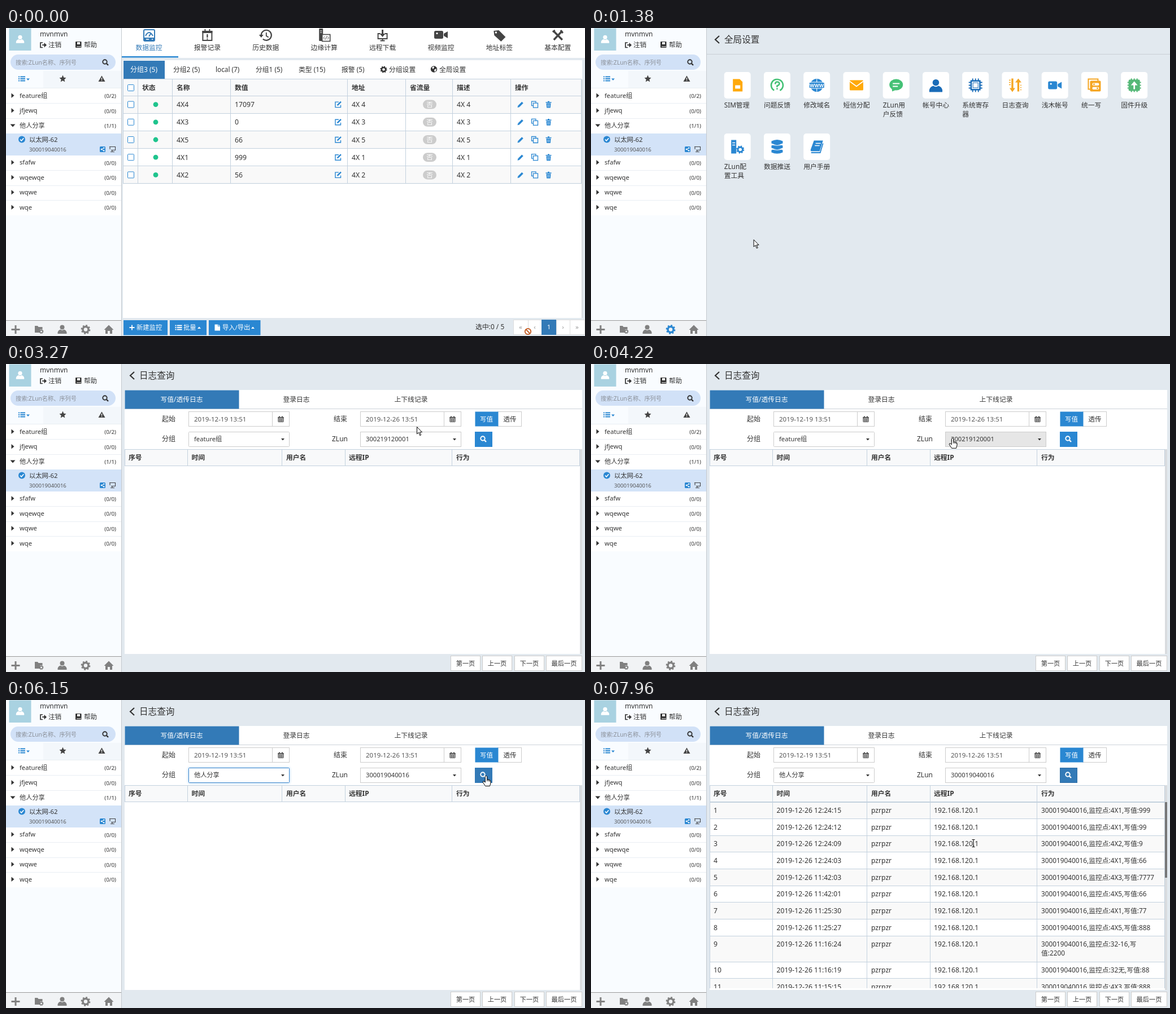
Write an HTML page that moves like this. It is 1025 px wide and 546 px high and loops after 8000 ms.

```html
<!DOCTYPE html>
<html lang="zh-CN">
<head>
<meta charset="utf-8">
<style>
html, body { margin: 0; height: 100%; overflow: hidden; background: #e2e9ef; }
svg { display: block; width: 100vw; height: 100vh; cursor: default;
  font-family: "Noto Sans", "Noto Sans CJK SC", "Noto Sans CJK", "Noto Sans CJK JP", sans-serif; }
text { white-space: pre; }
</style>
</head>
<body>
<svg id="stage" viewBox="0 0 1025 546"></svg>
<script>
const BLUE = '#2a87d2', NAVY = '#337ab7', DARK = '#333', ICON = '#444', GRID = '#c3d1de', BG = '#e2e9ef';
const AMBER = '#ffa90a', ORANGE = '#f5a623', GREEN = '#45c176', DEEP = '#1a6cb8';
const MID = 'text-anchor="middle"', END = 'text-anchor="end"', BOLD = 'font-weight="700"';
const HUB = 'ZLun', SERIAL = '300019040016';

// y is the vertical centre of the text
const text = (x, y, s, size = 12, fill = DARK, more = '') =>
  `<text x="${x}" y="${y + size * .37}" font-size="${size}" fill="${fill}" ${more}>${s}</text>`;
const rect = (x, y, w, h, fill, more = '') =>
  `<rect x="${x}" y="${y}" width="${w}" height="${h}" fill="${fill}" ${more}/>`;
const box = (x, y, w, h, fill = '#fff', line = '#ccc', more = '') =>
  rect(x + .5, y + .5, w - 1, h - 1, fill, `stroke="${line}" ${more}`);
const fillPath = (d, fill = ICON, more = '') => `<path d="${d}" fill="${fill}" ${more}/>`;
const line = (d, color = ICON, w = 1, more = '') =>
  `<path d="${d}" fill="none" stroke="${color}" stroke-width="${w}" ${more}/>`;
const disc = (x, y, r, fill, more = '') => `<circle cx="${x}" cy="${y}" r="${r}" fill="${fill}" ${more}/>`;
const ring = (x, y, r, color, w, more = '') => disc(x, y, r, 'none', `stroke="${color}" stroke-width="${w}" ${more}`);
const at = (x, y, body, s = 1) => `<g transform="translate(${x} ${y}) scale(${s})">${body}</g>`;
const group = (id, body, more = '') => `<g id="${id}" ${more}>${body}</g>`;
const each = (list, f) => list.map(f).join('');

const gear = (x, y, r, color) => ring(x, y, r * .6, color, r * .42) +
  ring(x, y, r * .86, color, r * .3, `stroke-dasharray="${r * .86 * Math.PI / 8}"`);
const person = (x, y, s, color) => at(x, y,
  disc(0, -4, 4, color) + fillPath('M-8 7.5V5Q-7 1-3 0Q0 2.5 3 0Q7 1 8 5V7.5Z', color), s);
const lens = (x, y, color, s = 1) => at(x, y,
  ring(-1, -1, 3.7, color, 1.9) + line('M2 2L5 5', color, 2.4), s);
const bars = (x, y, color) => at(x, y, line('M-6-3.5h2m1.3 0H6M-6 0h2m1.3 0H6M-6 3.5h2m1.3 0H6', color, 1.9));
const caret = (x, y, color, up = 1) => fillPath(`M${x - 3} ${y - 1.5 * up}h6l-3 ${3.5 * up}z`, color);
const camera = (x, y, s, color) => at(x, y,
  rect(-12, -7, 16, 14, color, 'rx="2.5"') + fillPath('M5-2L12-6V6L5 2Z', color) + disc(-7, -2.5, 1.6, '#fff'), s);
const chevron = line('M227 14L220 20.5L227 27', DARK, 2.2);

function sidebar() {
  const rows = [['feature组', 119.5, '0/2'], ['jfjewq', 146, '0/0'], ['他人分享', 172.5, '1/1'], ['sfafw', 238, '0/0'],
    ['wqewqe', 264.5, '0/0'], ['wqwe', 291, '0/0'], ['wqe', 317.5, '0/0']];
  return rect(0, 0, 204, 546, '#f9fcff') + rect(5.5, .5, 39, 39.5, '#a9d2e1') + person(25, 20, .9, '#fff') +
    text(60, 11, 'mvnmvn', 12) +
    line('M65 26H61V34.500H65M64 30.2H69', DARK, 1.7) + fillPath('M67.500 26L72 30.200L67.500 34.500Z', DARK) +
    text(75, 30, '注销', 11.6) +
    rect(123, 24, 10.5, 11, DARK, 'rx="1"') + rect(126, 25, 5, 4, '#fff') + line('M125 33H133', '#fff', 1) +
    text(138, 30, '帮助', 11.6) +
    rect(8, 47, 186, 27, '#d1e1f7', 'rx="13.5"') + text(17, 61, `搜索:${HUB}名称、序列号`, 10.2, '#8b9098') + lens(176, 61, DARK) +
    rect(66, 76, 138, 30, '#f3f7fb') + bars(28, 90, BLUE) + caret(39, 91, BLUE) +
    fillPath('M100.500 83.500L102.300 87.800L106.500 88.200L103.300 91.200L104.300 95.500L100.500 93.200L96.700 95.500L97.700 91.200L94.500 88.200L98.700 87.800Z') +
    fillPath('M169.500 84.500L175.500 95H163.500Z') + line('M169.500 88v3.500m0 1v1.300', '#fff', 1.3) +
    rect(0, 107, 204, 225, '#fff') +
    line('M0 106.500H204M0 133.500H204M0 160.500H204M0 252.500H204M0 279.500H204M0 305.500H204', '#e9eef3') +
    rect(0, 187, 204, 39, '#d3e3f8') +
    each(rows, ([name, y, n], i) =>
      fillPath(i == 2 ? `M7.500 ${y - 2}h9l-4.500 5z` : `M9.500 ${y - 4}v8.500l5-4.200z`, DARK) +
      text(24, y, name, 11.2) + text(195, y + 1, `(${n})`, 9.8, DARK, END)) +
    disc(28, 197.5, 6, BLUE) + line('M25 197.500L27.300 200L31.300 195.300', '#fff', 1.6) +
    text(41, 197.5, '以太网-62', 11.3) + text(41, 215, SERIAL, 9.6, '#555') +
    rect(166, 210, 10, 10, BLUE, 'rx="1.5"') + line('M173.500 212.500L169 215L173.500 217.500', '#fff', 1) +
    disc(173.3, 212.6, 1.2, '#fff') + disc(169, 215, 1.3, '#fff') + disc(173.3, 217.4, 1.2, '#fff') +
    line('M183 210.500H193.500V216.500H186M184 210v5M188 217v3M185 219.500H192', ICON, 1.1) +
    rect(0, 518, 204, 28, '#f1f3f5') + line('M0 518.500H204', '#999') +
    line('M17 527V542M9.500 534.500H24.500', '#808080', 3) +
    fillPath('M51 528h5l1.500 2h7v4H60v6H51z', '#808080') + gear(62.5, 538, 4, '#808080') +
    person(99.5, 534.5, 1, '#808080') + group('gear', gear(141, 534.5, 8.3, 'currentColor')) +
    fillPath('M182 526.500L190.500 535H188V542H184V537H180V542H176V535H173.500Z', '#808080') +
    line('M204.500 0V546', '#c4c9ce');
}

function monitorPage() {
  const nav = ['数据监控', '报警记录', '历史数据', '边缘计算', '远程下载', '视频监控', '地址标签', '基本配置'];
  const art = [
    rect(-9, -10, 19, 20, 'none', `rx="2" stroke="${NAVY}" stroke-width="2"`) + rect(-9, 4, 19, 6, NAVY) +
      line('M-6 1Q0-11 7 1M0 2L4-4', NAVY, 2) + line('M-5 7h5M5 7h2', '#fff', 1.4),
    line('M-8-7H8V9H-8Z', ICON, 2) + rect(-9, -8, 18, 4, ICON) + line('M-4-11v5M4-11v5', ICON, 2) + line('M0-2V4M0 5.500V7.500', ICON, 2.2),
    line('M-8 0A9 9 0 1 1-5 6.500', ICON, 2.2) + fillPath('M-12-1H-4L-8 4Z') + line('M1-5V1L5 3.500', ICON, 1.8),
    rect(-9, -12, 7, 22, ICON, 'rx="1"') + line('M-7-8h3M-7-5h3', '#fff', 1.2) + box(-4, -2, 15, 13, '#fff', ICON, 'stroke-width="1.6"') +
      line('M1 2L-1 4.500L1 7M6 2L8 4.500L6 7M4.500 1.500L2.500 7.500', ICON, 1),
    line('M-4-3H-8V6H8V-3H4M-4 9.500H4M0 6v3', ICON, 1.9) + fillPath('M-1.500-10h3v7H5L0 3-5-3h3.500z'),
    camera(0, -1, 1, ICON),
    fillPath('M-10-8L-1-9L11 3L3 11L-9 0Z') + disc(-6, -5, 1.7, '#fff'),
    line('M-7-7L8 8M8-8L-7 8', ICON, 3.4) + line('M-9-6L-5-9M5-9L9-4', ICON, 3)];
  const tabs = [['分组2 (5)', 296], ['local (7)', 371], ['分组1 (5)', 442], ['类型 (15)', 518], ['报警 (5)', 594], ['分组设置', 678], ['全局设置', 767]];
  const heads = [['状态', 241], ['名称', 302], ['数值', 405], ['地址', 612], ['省流量', 715], ['描述', 798], ['操作', 901]];
  const rows = [[4, 17097], [3, 0], [5, 66], [1, 999], [2, 56]];
  const check = y => box(215, y - 6, 12, 12, '#fff', BLUE, 'rx="1"');
  const row = ([n, value], i) => {
    const y = 135.6 + 31.2 * i;
    return rect(207, y - 14.6, 812, 31, i % 2 ? '#fff' : '#f9f9f9') + check(y) + disc(265, y, 4.4, '#1fc48d') +
      text(302, y, '4X' + n, 12.3) + text(405, y, value, 12.2) + text(612, y, '4X ' + n, 12.2) + text(798, y, '4X ' + n, 12.2) +
      at(588, y, line('M1-4.500H-5V5H4.500V1', BLUE, 1.4) + line('M-1.500 1.500L5-5', BLUE, 2.4)) +
      rect(738, y - 8, 24, 16, '#ccc', 'rx="8"') + text(750, y, '否', 11.5, '#fff', MID) +
      at(911, y, line('M-3 3L3.500-3.500', BLUE, 3.6) + fillPath('M-5.500 5.500L-4.500 1.500L-1.500 4.500Z', BLUE)) +
      at(936, y, line('M-2.500 2H-5.500V-5.500H2V-3M-2.500-2.500H5.500V5.500H-2.500Z', BLUE, 1.3)) +
      at(960.5, y, line('M-5-3.500H5M-1.500-5H1.500', BLUE, 1.5) + fillPath('M-4-2H4L3.300 6H-3.300Z', BLUE) + line('M-1.300-.5v5M1.300-.5v5', '#fff', .8));
  };
  const button = (x, w, label, tx) => rect(x, 518, w, 26.5, BLUE) + text(tx, 531, label, 11.3, '#fff');
  return rect(205, 0, 820, 53, '#fff') + rect(205, 50, 100, 2.5, BLUE) +
    each(nav, (s, i) => at(253 + 103.4 * i, 13, art[i]) + text(253 + 103.4 * i, 35, s, 11.8, i ? DARK : NAVY, MID)) +
    rect(207, 57, 813, 457, '#fff') + rect(208, 58, 73, 32, NAVY) + text(220, 74, '分组3 (5)', 12, '#fff') +
    each(tabs, ([s, x]) => text(x, 74, s, 11.8)) + gear(668.5, 73.5, 6, DARK) +
    disc(757.5, 73, 5.7, DARK) + fillPath('M754 70l3-2 1 2-2 3zM758 74l4-2-1 4-2 2z', '#fff') +
    rect(207, 91, 812, 30, '#f8f9fa') + check(106) + each(heads, ([s, x]) => text(x, 106, s, 11.8, DARK, BOLD)) +
    each(rows, row) +
    line(each([91, 121, 152, 183, 214, 245, 276], y => `M207 ${y - .5}H1019`) +
      each([208, 234, 295, 398, 605, 708, 791, 894, 1019], x => `M${x - .5} 91V276`), GRID) +
    rect(1019, 91, 2, 423, '#d5d9dd') +
    button(208, 78, '新建监控', 231) + line('M223 526.500v9M218.500 531h9', '#fff', 1.8) +
    button(290, 65, '批量', 314) + bars(305.5, 531, '#fff') + caret(342, 531.5, '#fff', -1) +
    button(359, 91.5, '导入/导出', 383) + fillPath('M369.500 525.500H375V529H379V536.500H369.500ZM376 525.500L379 528.300H376Z', '#fff') + caret(437, 531.5, '#fff', -1) +
    text(831, 530, '选中:0 / 5', 11.9) + box(898, 517, 127, 27, '#fff', '#ddd') +
    line('M924.500 517v27M974.500 517v27M998.500 517v27', '#ddd') + rect(948, 517, 26, 27, NAVY) +
    each(['«', '‹', '1', '›', '»'], (s, i) => text([911, 936, 961, 986, 1011][i], 530, s, 11.5, i == 2 ? '#fff' : '#999', MID));
}

function settingsPage() {
  const pins = each([-5, 0, 5], v => `M${v}-12V12M-12 ${v}H12`);
  const art = [
    fillPath('M-8-11H4L9-6V11H-8Z', AMBER) + rect(-4, 0, 9, 6, '#fff'),
    ring(0, 0, 10.5, GREEN, 2.6, 'stroke-dasharray="55 11" transform="rotate(120)"') + line('M-3.500-2Q-3-6 0-6Q4-6 4-2.500Q3.500 0 0 1V3.500M0 5V7.500', GREEN, 2.6),
    disc(0, 0, 11.5, BLUE) + line('M-11-5.500H11M-11 5.500H11M0-11V-5M0 5V11', '#fff', 1.1) + rect(-13, -4.5, 26, 9, BLUE) + text(0, 0, 'WWW', 8.5, '#fff', MID + ' ' + BOLD),
    rect(-12, -9, 24, 18, AMBER, 'rx="1.5"') + line('M-12-7L0 2L12-7', '#fff', 1.7),
    `<ellipse cx="0" cy="-1" rx="12" ry="10" fill="${GREEN}"/>` + fillPath('M-8 4L-7 11L0 8Z', GREEN) + line('M-6-3H6M-6 2H3', '#fff', 1.8),
    person(0, 1, 1.45, DEEP),
    line(pins, DEEP, 1.9) + rect(-9, -9, 18, 18, DEEP) + rect(-6.5, -6.5, 13, 13, '#fff') + rect(-4.5, -4.5, 9, 9, 'none', `stroke="${DEEP}"`),
    line('M-5-12V8M5.500 11V-8', ORANGE, 3.4) + fillPath('M-10 5H0L-5 12ZM0-5H11L5.500-12Z', ORANGE) + line('M-11-9h3M-11-5h3M-11-1h3M9 0h2M9 4h2M9 8h2', ORANGE, 1.6),
    camera(0, 0, 1, BLUE),
    line('M-6 7H-11V-11H6V-7', ORANGE, 2) + rect(-8, -8, 19, 19, ORANGE, 'rx="2"') + rect(-4, -4, 12, 4.5, '#fff', 'rx="2"') + rect(-4, 3, 12, 4.5, '#fff', 'rx="2"') + disc(-1, -1.8, 1.5, ORANGE) + disc(5, 5.2, 1.5, ORANGE),
    line(pins, '#55b877', 2.2) + rect(-10, -10, 20, 20, '#55b877', 'rx="2"') + line('M0 7V-3', '#fff', 2.8) + fillPath('M-6 0L0-7L6 0Z', '#fff'),
    rect(-11, -12, 9, 24, BLUE) + line('M-9-7h5M-9-3h5', '#fff', 1.4) + gear(5, 5, 7, BLUE),
    each([-8, 0, 8], y => fillPath(`M-10 ${y - 2}Q0 ${y - 7} 10 ${y - 2}V${y + 2}Q0 ${y + 6.500}-10 ${y + 2}Z`, BLUE)) + line('M-10-4.500Q0 0 10-4.500M-10 3.500Q0 8 10 3.500', '#fff', 1.2),
    fillPath('M-5-11H11L5 8H-9Q-12 8-10.500 4Z', BLUE) + line('M-10 10.500H6L11-6', BLUE, 1.8) + line('M-2-6H7M-3.500-2H5', '#fff', 1.5)];
  const labels = ['SIM管理', '问题反馈', '修改域名', '短信分配', HUB + '用|户反馈', '帐号中心', '系统寄存|器', '日志查询', '浅木帐号', '统一写', '固件升级',
    HUB + '配|置工具', '数据推送', '用户手册'];
  return chevron + text(236, 20, '全局设置', 15.6) + line('M205 46.500H1025', '#c9cfd5') +
    each(labels, (s, i) => {
      const x = 235.7 + 70.25 * (i % 11), y = i < 11 ? 78 : 187;
      return rect(x, y, 47, 47, '#fff', 'rx="5"') + at(x + 23.5, y + 23.5, art[i]) +
        each(s.split('|'), (part, k) => text(x, y + 59 + 16 * k, part, 11.8));
    });
}

function logPage() {
  const records = ['12:24:15 4X1 999', '12:24:12 4X1 99', '12:24:09 4X2 9', '12:24:03 4X1 66', '11:42:03 4X3 7777', '11:42:01 4X5 66',
    '11:25:30 4X1 77', '11:25:27 4X5 888', '11:16:24 32-16 2200', '11:16:19 32无 88', '11:15:15 4X3 888'];
  const cols = [217, 328.5, 496, 607, 797], edges = [211, 322, 489, 601, 790, 1016];
  const date = (x, label, lx, day) => text(lx, 97.5, label) + box(x, 84, 179, 27) + line(`M${x + 148.500} 84v27`, '#ccc') +
    text(x + 10, 97.5, `2019-12-${day} 13:51`, 11.5, '#555') +
    at(x + 163.5, 98, line('M-4.500-3.500H4.500V4.500H-4.500ZM-4.500-1H4.500M-4.500 1.800H4.500M-1.500-1V4.500M1.500-1V4.500', DARK, 1) + line('M-2.500-5.500v3M2.500-5.500v3M-5-3.200H5', DARK, 1.6));
  const row = (s, i) => {
    const [time, point, value] = s.split(' '), y = 195.7 + 29.65 * i + (i > 8 ? 16.3 : 0), tall = i == 8;
    const cells = [i + 1, '2019-12-26 ' + time, 'pzrpzr', '192.168.120.1'];
    const action = `${SERIAL},监控点:${point},写`;
    return rect(211, y - 14.7, 805, tall ? 46 : 29.65, i % 2 ? '#fff' : '#f9f9f9') + line(`M211 ${Math.round(y - 15.2) + .5}H1016`, GRID) +
      each(cells, (c, k) => text(cols[k], y, c, 12.15)) + text(cols[4], y, action + (tall ? '' : `值:${value}`), 11.8) +
      (tall ? text(cols[4], y + 16, `值:${value}`, 11.8) : '');
  };
  const verticals = bottom => line(each(edges, x => `M${x - .5} 151V${bottom}`), GRID);
  const pages = [['第一页', 787, 53], ['上一页', 843, 53], ['下一页', 900, 53], ['最后一页', 956, 64]];
  return chevron + text(236, 20, '日志查询', 15.6) + rect(210, 46, 810, 468, '#fff') + line('M210 79.500H1020', '#ccd3da') +
    rect(210.5, 46.5, 202, 33, NAVY) + each(['写值/透传日志', '登录日志', '上下线记录'], (s, i) => text(311 + 203 * i, 63, s, 11.8, i ? DARK : '#fff', MID)) +
    date(323, '起始', 276, 19) + date(627, '结束', 580, 26) +
    box(870, 84, 43, 27) + rect(830.5, 84.5, 41, 26, BLUE) + text(850.5, 97.5, '写值', 11.5, '#fff', MID) + text(892, 97.5, '透传', 11.5, DARK, MID) +
    text(276, 133, '分组') + box(323, 120, 179, 27, '#fff', '#ccc', 'id="groupBox" rx="1"') + text(333, 133, '', 11.2, DARK, 'id="groupText"') +
    group('groupCaret', caret(490, 133.5, DARK)) + group('typeMark', line('M333.500 126v14', DARK)) +
    text(577, 133, HUB, 12) + box(627, 120, 179, 27, '#fff', '#ccc', 'id="hubBox"') + text(637, 133, '', 11.2, DARK, 'id="hubText"') + caret(794, 133.5, DARK) +
    box(830, 120, 31, 27, BLUE, BLUE, 'id="find"') + lens(845, 133, '#fff') +
    rect(1016, 151, 4, 363, '#d9dcdf') +
    group('records', each(records, row) + verticals(511) + rect(1016, 181, 4, 134, '#777'), 'clip-path="url(#tableClip)"') +
    rect(211, 151, 805, 30, '#f8f9fa') + line('M211 151.500H1016M211 180.500H1016', GRID) + verticals(181) +
    each(['序号', '时间', '用户名', '远程IP', '行为'], (s, i) => text(cols[i], 166, s, 11.8, DARK, BOLD)) +
    each(pages, ([s, x, w]) => box(x, 517, w, 27) + text(x + w / 2, 530.5, s, 11.2, DARK, MID)) +
    group('menu', box(323, 146, 125, 155, '#f4f4f4', '#c8c8c8', 'rx="2" style="filter:drop-shadow(0 3px 4px #0003)"') +
      rect(336, 152, 99, 21, '#428bca', 'id="mark"') +
      each(['feature组', 'jfjewq', '他人分享', 'sfafw', 'wqewqe', 'wqwe', 'wqe'], (s, i) =>
        text(385.5, 162.3 + 20.3 * i, s, 11.2, DARK, MID + ' class="item"')));
}

const ink = 'stroke="#000" stroke-linejoin="round"';
const pointers = {
  ban: ring(0, 0, 5.2, '#c2571c', 1.8) + line('M-3.700-3.700L3.700 3.700', '#c2571c', 1.8),
  arrow: fillPath('M0 0V12.500L3 9.800L5.200 15.200L7.200 14.300L5 9.300H9Z', '#fff', ink),
  hand: fillPath('M-1.700 1.600Q0-1 1.700 1.600V7L4 7.200L6.500 8L8 9.500V13L6.500 18.500H-1.500L-5.800 11.800Q-5.500 9.300-4 10L-1.700 12Z', '#fff', ink) +
    line('M1.700 7v3M4 7.300v3M6.300 8v2.800', '#000', .9),
  beam: line('M-2.500-6.500H-.500L0-6L.500-6.500H2.500M0-6V6M-2.500 6.500H-.500L0 6L.500 6.500H2.500', '#000', 1.1)
};

document.getElementById('stage').innerHTML =
  '<clipPath id="tableClip"><path d="M205 150H1025V511H205Z"/></clipPath>' + rect(0, 0, 1025, 546, BG) +
  group('monitor', monitorPage()) + group('settings', settingsPage()) + group('log', logPage()) + sidebar() +
  group('pointer', each(Object.keys(pointers), k => group(k, pointers[k])));

const el = Object.fromEntries([...document.querySelectorAll('[id]')].map(e => [e.id, e]));
const items = [...document.querySelectorAll('.item')];
const show = (id, on) => el[id].style.display = on ? '' : 'none';
const paint = (id, fill, stroke) => { el[id].setAttribute('fill', fill); el[id].setAttribute('stroke', stroke); };

// start, end, steps, control point, end point
const moves = [
  [70, 130, 2, 460, 433, 625, 460],
  [300, 1070, 11, 380, 400, 139, 531],
  [1160, 1230, 2, 140, 532, 141, 534],
  [1380, 1540, 3, 392, 250, 461, 242],
  [1780, 2580, 11, 860, 130, 774, 112],
  [2650, 2820, 3, 755, 106, 745, 103],
  [3190, 3900, 10, 700, 125, 668, 140],
  [4000, 4770, 11, 695, 113, 362, 165],
  [4840, 5150, 5, 348, 192, 372, 204],
  [5230, 5610, 6, 510, 185, 634, 150],
  [5690, 6150, 7, 740, 152, 850, 134],
  [6790, 7410, 9, 790, 215, 702, 235],
  [7960, 7960, 1, 677, 254, 677, 254]
];
function locate(t) {
  let x = 924, y = 538;
  for (const [from, to, n, cx, cy, ex, ey] of moves) {
    if (t < from) break;
    const pause = (to - from) / (n - 1) || 1;
    const k = Math.min(1, (Math.floor((t - from) / pause + .25) + 1) / n), q = 1 - k;
    x = q * q * x + 2 * q * k * cx + k * k * ex;
    y = q * q * y + 2 * q * k * cy + k * k * ey;
  }
  return [x, y];
}

function draw() {
  const t = performance.now() % 8000, [x, y] = locate(t);
  const over = (l, top, w, h) => x >= l && x < l + w && y >= top && y < top + h;
  const page = t < 1380 ? 'monitor' : t < 3190 ? 'settings' : 'log';
  for (const p of ['monitor', 'settings', 'log']) show(p, p == page);
  el.gear.style.color = t >= 1000 && t < 3050 ? BLUE : '#808080';

  const open = t >= 4680 && t < 5230, focus = t >= 4600 && t < 6790;
  const onGroup = over(323, 120, 179, 27), onHub = over(627, 120, 179, 27), onFind = over(830, 120, 31, 27);
  paint('groupBox', onGroup && !open ? '#e6e6e6' : '#fff', open ? '#66afe9' : focus ? '#3f87cc' : '#ccc');
  el.groupBox.style.filter = focus ? 'drop-shadow(0 0 2px #66afe9aa)' : '';
  el.groupText.textContent = open ? '请选择' : t < 5230 ? 'feature组' : '他人分享';
  el.groupText.setAttribute('fill', open ? '#999' : DARK);
  show('groupCaret', !open);
  show('typeMark', open);
  show('menu', open);
  const active = t < 4960 ? 0 : t < 5080 ? 1 : 2;
  el.mark.setAttribute('y', 152 + 20.3 * active);
  items.forEach((e, i) => e.setAttribute('fill', i == active ? '#fff' : DARK));
  paint('hubBox', onHub ? '#e6e6e6' : '#fff', '#ccc');
  el.hubText.textContent = t < 5310 ? '300219120001' : SERIAL;
  const clicked = t >= 6790;
  paint('find', onFind || clicked ? NAVY : BLUE, clicked ? '#2e6da4' : onFind ? NAVY : BLUE);
  show('records', t >= 7580);

  const onCard = (x - 235.7) % 70.25 < 47 && (over(235, 78, 760, 47) || over(235, 187, 188, 47));
  const hot = { monitor: over(130, 520, 25, 26), settings: onCard, log: onGroup || onHub || onFind || open }[page];
  const kind = t < 70 ? 'ban' : t >= 7960 ? 'beam' : hot ? 'hand' : 'arrow';
  for (const k in pointers) show(k, k == kind);
  el.pointer.setAttribute('transform', `translate(${x} ${y})`);
  requestAnimationFrame(draw);
}
draw();
</script>
</body>
</html>
```
